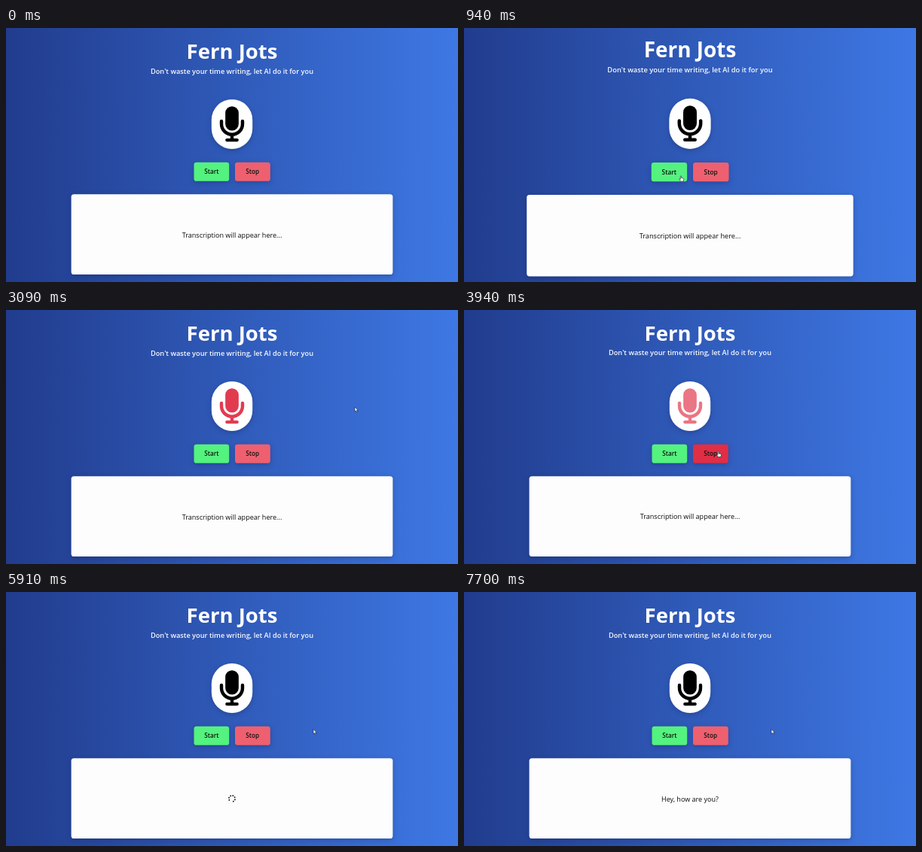
Recreate the animation shown at these times as an HTML page. Size 600 by 338 pixels, loop 7730 ms.

```html
<!DOCTYPE html>
<html lang="en">
<head>
<meta charset="utf-8">
<title>Fern Jots</title>
<style>
  html, body { margin: 0; width: 100%; height: 100%; overflow: hidden; }
  svg { display: block; width: 100vw; height: 100vh; }
  text { font-family: "Open Sans", "Noto Sans", sans-serif; text-anchor: middle; }
  .heading { font-size: 27.5px; font-weight: 700; fill: #fff; }
  .tagline { font-size: 9.22px; font-weight: 600; fill: #f8faff; }
  .label { font-size: 8.2px; font-weight: 600; fill: #10140f; }
  .result { font-size: 9.05px; fill: #0c0c0e; }
  .raised { filter: drop-shadow(0 2.5px 3px rgba(10, 20, 60, .28)); }
</style>
</head>
<body>
<svg viewBox="0 0 600 338" preserveAspectRatio="none">
  <defs>
    <linearGradient id="sky">
      <stop offset="0" stop-color="#213c8d"/>
      <stop offset="1" stop-color="#3e78e4"/>
    </linearGradient>
  </defs>
  <rect width="600" height="338" fill="url(#sky)"/>

  <g id="scene">
    <text class="heading" x="300" y="41.3">Fern Jots</text>
    <text class="tagline" x="300" y="60.5">Don't waste your time writing, let AI do it for you</text>

    <rect class="raised" x="272.8" y="95" width="54.4" height="66" rx="27.2" fill="#fff"/>
    <g id="mic" transform="translate(283.8 104.2) scale(.092)" fill="none" stroke-width="48" stroke-linecap="round">
      <rect id="capsule" x="80" width="192" height="352" rx="96" stroke="none"/>
      <path d="M24 216v40a152 152 0 0 0 304 0v-40M176 420V480M104 488H248"/>
    </g>

    <g class="raised">
      <rect x="249.5" y="178.8" width="46.7" height="25" rx="3.4" fill="#54f27f"/>
      <rect id="stop" x="304" y="178.8" width="46.8" height="25" rx="3.4"/>
    </g>
    <text class="label" x="272.8" y="194.2">Start</text>
    <text class="label" x="327.2" y="194.2">Stop</text>

    <rect class="raised" x="86.6" y="221.2" width="426.8" height="106.8" rx="3.6" fill="#fdfdfe"/>
    <text class="result" id="hint" x="300" y="278.5">Transcription will appear here...</text>
    <text class="result" id="reply" x="300" y="278.5">Hey, how are you?</text>
    <g id="spinner" fill="#161618"></g>

    <g id="cursor">
      <path id="arrow" d="M0 0V6.2L1.4 5L2.4 7.1L3.4 6.6L2.5 4.6H4.3Z"
            fill="#fff" stroke="#14182c" stroke-width=".6" stroke-linejoin="round"/>
      <path id="hand" d="M0 .6Q.7-.4 1.3.6V3L3.9 3.6Q4.6 3.9 4.4 4.8L3.8 7.6H.4L-1.6 4.6Q-1.4 3.7-.6 4.2L0 4.8Z"
            fill="#fff" stroke="#14182c" stroke-width=".6" stroke-linejoin="round"/>
    </g>
  </g>
</svg>

<script>
  const LOOP = 7730;
  const RECORD = 1310, FINISH = 4485, REPLY = 6500;
  const ZOOMS = [780, 3940], ZOOM_TIME = 600, ZOOM_GAIN = 0.028;
  const RED = "#e02e45";

  // time, x, y of the pointer tip
  const PATH = [
    [60, 592, 2], [720, 287.5, 196], [1340, 287.5, 196], [1480, 524, 146],
    [1600, 463, 129], [3240, 463, 129], [3480, 521, 142],
    [3900, 337, 188], [4860, 337, 188], [5250, 408, 182.5]
  ];

  const el = id => document.getElementById(id);
  const show = (id, on) => el(id).setAttribute("visibility", on ? "visible" : "hidden");
  const within = (t, from, to) => t >= from && t < to;
  const smooth = p => p * p * (3 - 2 * p);

  // seven dots on a ring, leaving the upper right place empty
  const ring = [0, 1, 2, 3, 4, 5, 6].map(i => {
    const a = i * Math.PI / 4;
    return `<circle cx="${4.1 * Math.cos(a)}" cy="${4.1 * Math.sin(a)}" r=".95"/>`;
  });
  el("spinner").innerHTML = ring.join("");

  function pointerAt(t) {
    const next = PATH.findIndex(key => key[0] > t);
    if (next === 0) return PATH[0].slice(1);
    if (next < 0) return PATH[PATH.length - 1].slice(1);
    const [t0, x0, y0] = PATH[next - 1], [t1, x1, y1] = PATH[next];
    const p = smooth((t - t0) / (t1 - t0));
    return [x0 + (x1 - x0) * p, y0 + (y1 - y0) * p];
  }

  function zoomAt(t) {
    const start = ZOOMS.find(z => within(t, z, z + ZOOM_TIME));
    if (start === undefined) return 1;
    return 1 + ZOOM_GAIN * Math.sin(Math.PI * (t - start) / ZOOM_TIME) ** 2;
  }

  // opacity runs from 1 to .5 and back every two seconds
  function pulse(t) {
    const p = (t % 2000) / 1000;
    return 1 - 0.5 * smooth(p < 1 ? p : 2 - p);
  }

  function draw(t) {
    const zoom = zoomAt(t);
    el("scene").setAttribute("transform",
      `translate(300 169) scale(${zoom}) translate(-300 -169)`);

    const recording = within(t, RECORD, FINISH);
    const ink = recording ? RED : "#000";
    el("mic").setAttribute("stroke", ink);
    el("capsule").setAttribute("fill", ink);
    el("mic").setAttribute("opacity", recording ? pulse(t - RECORD) : 1);

    el("stop").setAttribute("fill", within(t, 3830, 4920) ? RED : "#ee6070");

    show("hint", t < FINISH);
    show("spinner", within(t, FINISH, REPLY));
    show("reply", t >= REPLY);
    el("spinner").setAttribute("transform",
      `translate(300 275) rotate(${(t - FINISH) * 0.36})`);

    const [x, y] = pointerAt(t);
    const pointing = within(t, 650, 1350) || within(t, 3830, FINISH);
    el("cursor").setAttribute("transform", `translate(${x} ${y})`);
    show("arrow", t >= 60 && !pointing);
    show("hand", pointing);
  }

  const begin = performance.now();
  function tick() {
    draw((performance.now() - begin) % LOOP);
    requestAnimationFrame(tick);
  }
  tick();
</script>
</body>
</html>
```
